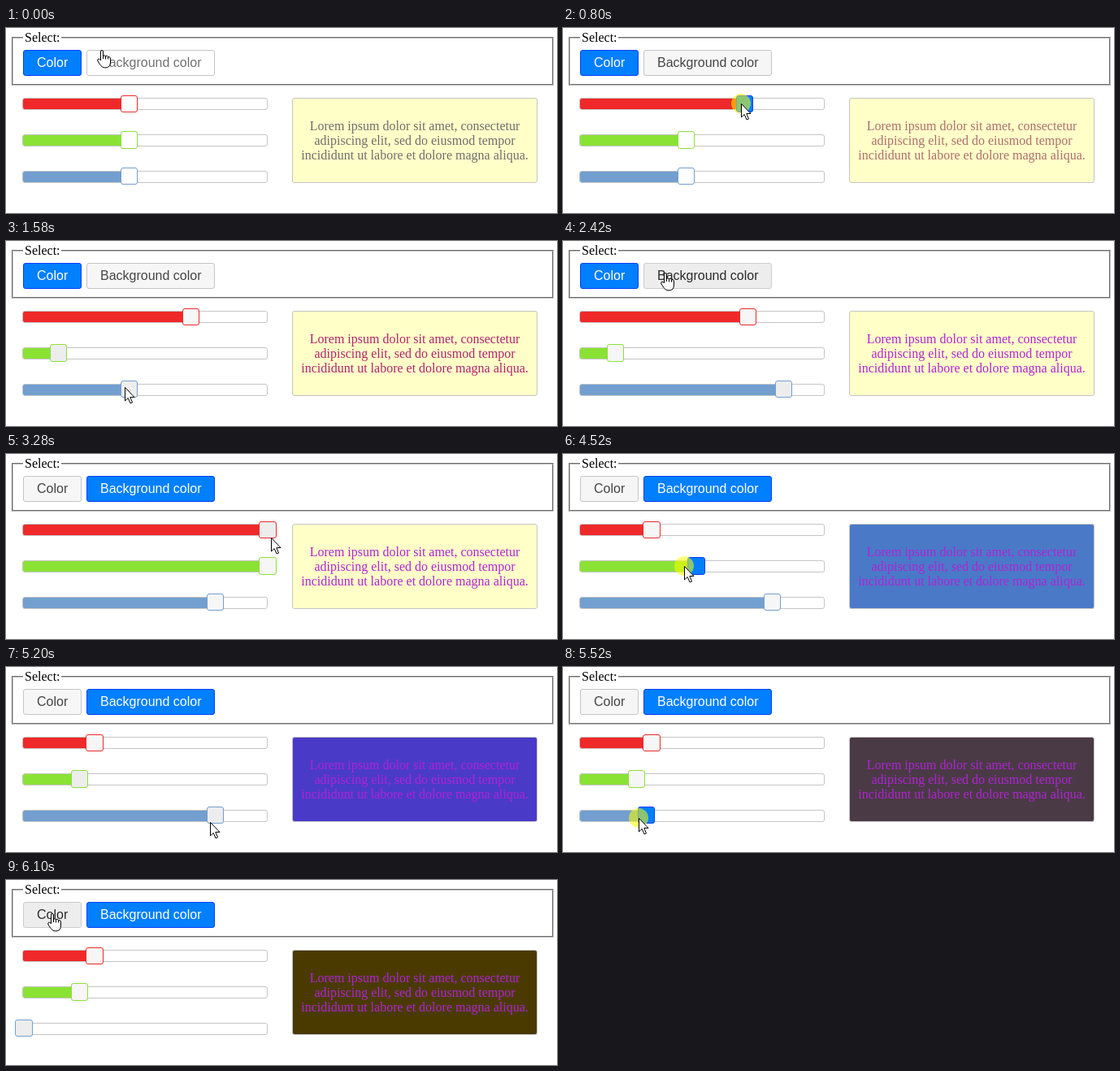
Animation, 678 px wide and 228 px high, one loop 6140 ms. Source, as an HTML page:

```html
<!DOCTYPE html>
<html lang="en">
<head>
<meta charset="utf-8">
<title>Color sliders</title>
<style>
html, body { margin: 0; width: 100%; height: 100%; overflow: hidden; background: #fff; }
svg { position: absolute; left: 0; top: 0; display: block; }
fieldset { position: absolute; box-sizing: border-box; left: 7px; top: 11px; width: 667px; height: 60px;
  margin: 0; padding: 0; border: 2px groove #c0c0c0; }
text { font: 16px "Liberation Serif", "Times New Roman", serif; }
.button text { font-family: "Liberation Sans", Arial, sans-serif; }
.frame { fill: #fff; stroke: #c5c5c5; }
</style>
</head>
<body>
<fieldset></fieldset>
<svg width="678" height="228" viewBox="0 0 678 228">
  <rect x="21" y="3" width="47" height="18" fill="#fff"/>
  <text x="23" y="17">Select:</text>
  <g class="button" id="color">
    <rect x="21.5" y="27.5" width="71" height="31" rx="2.5"/>
    <text x="38" y="48">Color</text>
  </g>
  <g class="button" id="background">
    <rect x="99.5" y="27.5" width="157" height="31" rx="2.5"/>
    <text x="116" y="48">Background color</text>
  </g>
  <g id="sliders"></g>
  <rect id="box" x="352.5" y="86.5" width="301" height="104" rx="2.5" stroke="#c5c5c5"/>
  <g id="lorem" text-anchor="middle">
    <text x="503" y="126">Lorem ipsum dolor sit amet, consectetur</text>
    <text x="503" y="144">adipiscing elit, sed do eiusmod tempor</text>
    <text x="503" y="162">incididunt ut labore et dolore magna aliqua.</text>
  </g>
  <g id="cursor" stroke="#000" fill="#fff">
    <circle id="halo" r="12" fill="#ff0" fill-opacity=".55" stroke="none"/>
    <path id="arrow" d="M.5 .5V17L4.2 13.5L7 20L9.5 19L6.8 12.5H12Z"/>
    <g id="hand">
      <path d="M-1.5 12V2Q-1.5 .5 0 .5T1.5 2V7.5Q3 6 4.5 7.5Q6.5 6.5 7.5 8.5Q10.5 8 10.5 11V15Q10.5 22 4 22Q0 22 -2 18.5L-5 14Q-6 11.5 -4 11Q-2.8 11 -1.5 13Z"/>
      <path d="M1.5 7V11M4.5 7.5V11.5M7.5 8.5V11.5" fill="none"/>
    </g>
  </g>
</svg>
<script>
const LOOP = 6140, SWITCH = 2570;
const GRIP = [-6, 7];   // pointer offset from the handle's x and the track's top
const LEAD = 6;         // the pointer runs this many ms ahead of the handle
const START = [110, 110, 110], BACKGROUND = [255, 255, 200];

// The pointer arrives, drags a slider to a value, then moves on to the next one.
const drags = [
  { slider: 0, arrive: 340, start: 510, end: 850, value: 175 },
  { slider: 1, arrive: 1080, start: 1150, end: 1370, value: 36 },
  { slider: 2, arrive: 1580, start: 1850, end: 2120, value: 212, grip: [-5, 4] },
  { slider: 0, arrive: 3090, start: 3350, end: 3700, value: 67, grip: [4, 17] },
  { slider: 0, arrive: 3700, start: 3700, end: 3930, value: 74 },
  { slider: 1, arrive: 4340, start: 4390, end: 4600, value: 58 },
  { slider: 2, arrive: 5000, start: 5230, end: 5710, value: 0, grip: [-6, 15] }
];
const click = { arrive: 2450, start: 2480, end: SWITCH, at: [123, 36] };

const $ = id => document.getElementById(id);
const set = (el, attrs) => { for (const k in attrs) el.setAttribute(k, attrs[k]); };
const ease = u => { u = Math.min(1, Math.max(0, u)); return u * u * (3 - 2 * u); };
const mix = (a, b, u) => a + (b - a) * u;
const second = t => t >= SWITCH;
const offset = v => v * 300 / 255;

function value(i, t) {
  let v = (second(t) ? BACKGROUND : START)[i];
  for (const d of drags) {
    if (d.slider === i && d.start <= t && second(d.start) === second(t))
      v = mix(v, d.value, ease((t - d.start) / (d.end - d.start)));
  }
  return v;
}

const sliders = ['#ef2929', '#8ae234', '#729fcf'].map((tint, i) => ({ tint, y: 86.4 + 44.8 * i }));

// Pointer stops, derived from the drags
const stops = [{ t: 30, at: [118, 27] }];
function stop(t, at) { stops.push({ t, at }); }
for (const d of drags) {
  if (second(d.start) && !second(stops[stops.length - 1].t)) {
    stop(click.arrive, click.at);
    stop(click.end, click.at);
  }
  const point = (v, grip) => [22 + offset(v) + grip[0], sliders[d.slider].y + grip[1]];
  const grab = point(value(d.slider, d.start), d.grip || GRIP);
  stop(d.arrive, grab);
  stop(d.start - LEAD, grab);
  stop(d.end - LEAD, point(d.value, GRIP));
}
stop(6090, [57, 41]);

function pointer(t) {
  const n = stops.findIndex(s => s.t > t);
  if (n < 1) return stops[n ? stops.length - 1 : 0].at;
  const a = stops[n - 1], b = stops[n];
  const u = ease((t - a.t) / (b.t - a.t));
  return a.at.map((p, i) => mix(p, b.at[i], u));
}

// Snaps an outlined box with fractional edges to whole pixels
function place(el, left, top, right, bottom) {
  const [l, t, r, b] = [left, top, right, bottom].map(Math.round);
  set(el, { x: l + .5, y: t + .5, width: r - l - 1, height: b - t - 1 });
}

function addRect(attrs) {
  const el = document.createElementNS('http://www.w3.org/2000/svg', 'rect');
  set(el, attrs);
  return $('sliders').appendChild(el);
}

for (const s of sliders) {
  place(addRect({ rx: 2.5, class: 'frame' }), 20, s.y, 322, s.y + 14.8);
  const top = Math.round(s.y + 1);
  s.range = addRect({ x: 21, y: top, height: Math.round(s.y + 13.8) - top, rx: 2, fill: s.tint });
  s.handle = addRect({ rx: 2.5 });
}

function styleButton(id, active, hover, fresh) {
  const [fill, stroke, ink] =
    active ? ['#007fff', '#003eff', '#fff'] :
    fresh ? ['#fff', '#c5c5c5', '#707070'] :
    hover ? ['#ededed', '#ccc', '#2b2b2b'] : ['#f6f6f6', '#c5c5c5', '#454545'];
  set($(id).children[0], { fill, stroke });
  set($(id).children[1], { fill: ink });
}

const color = t => 'rgb(' + sliders.map((s, i) => Math.round(value(i, t))) + ')';
const show = (id, on) => set($(id), { visibility: on ? 'visible' : 'hidden' });

function draw(t) {
  const [x, y] = pointer(t).map(Math.round);
  const begun = drags.filter(d => d.start <= t);
  const last = begun[begun.length - 1];
  const dragging = !!last && t < last.end + 40;

  sliders.forEach((s, i) => {
    const dx = offset(value(i, t));
    const current = !!last && last.slider === i && second(last.start) === second(t);
    const pressed = current && dragging;
    const hover = Math.abs(x - 22 - dx) < 11 && Math.abs(y - s.y - 7) < 11;
    const touched = begun.some(d => d.slider === i);
    const fill = pressed ? '#007fff' : hover || current ? '#ededed' : touched ? '#f6f6f6' : '#fff';
    set(s.range, { width: Math.round(dx) });
    set(s.handle, { fill, stroke: pressed ? '#003eff' : s.tint });
    place(s.handle, 11.4 + dx, s.y - 3.8, 32.6 + dx, s.y + 17.4);
  });

  const inRow = y >= 26 && y < 59;
  const onColor = inRow && x >= 21 && x < 93;
  const onBackground = inRow && x >= 99 && x < 257;
  styleButton('color', !second(t), onColor);
  styleButton('background', second(t), onBackground, t < 30);

  set($('lorem'), { fill: color(Math.min(t, SWITCH - 1)) });
  set($('box'), { fill: color(Math.max(t, SWITCH)) });

  set($('cursor'), { transform: `translate(${x} ${y})` });
  show('halo', dragging || t >= click.start && t < click.end);
  show('hand', onColor || onBackground);
  show('arrow', !onColor && !onBackground);
}

const begin = performance.now();
function tick() {
  draw((performance.now() - begin) % LOOP);
  requestAnimationFrame(tick);
}
tick();
</script>
</body>
</html>
```
